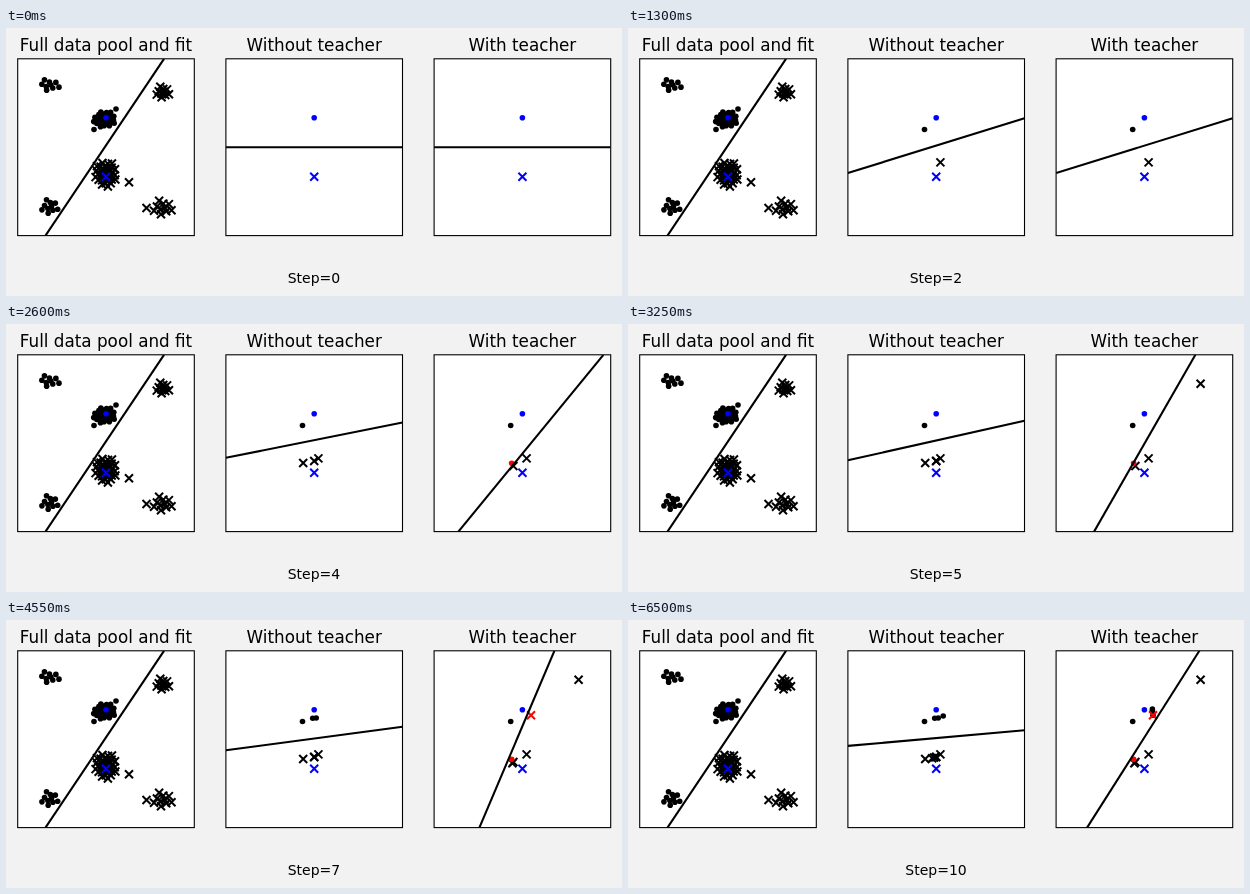
Write an HTML page that moves like this. It is 616 by 268 pixels and loops after 7.8 s.

```html
<!DOCTYPE html>
<html lang="en">
<head>
<meta charset="utf-8">
<title>Learning with and without a teacher</title>
<style>
html, body { margin: 0; width: 100%; height: 100%; overflow: hidden; background: #f2f2f2; }
svg { display: block; width: 616px; height: 268px; }
text { font-family: "DejaVu Sans", sans-serif; text-anchor: middle; fill: #000; }
.title { font-size: 16.8px; }
.step { font-size: 14px; }
.cross { fill: none; stroke-width: 2; }
.fit { stroke: #000; stroke-width: 2.1; }
.frame { fill: none; stroke: #000; stroke-width: 1.1; }
</style>
</head>
<body>
<svg id="stage" viewBox="0 0 616 268">
  <defs><clipPath id="box"><rect x="11.7" y="30.8" width="176.6" height="176.8"/></clipPath></defs>
</svg>
<script>
const STEP_MS = 650, LOOP_MS = 7800, LAST = 10;
const LEFT = 11.7, TOP = 30.8, WIDTH = 176.6, HEIGHT = 176.8;
const RIGHT = LEFT + WIDTH, BOTTOM = TOP + HEIGHT;
const PITCH = 208.2, GOLDEN = Math.PI * (3 - Math.sqrt(5));
const RED = '#f00', BLUE = '#00f';
const stage = document.getElementById('stage');

function set(el, attrs) {
  for (const k in attrs) el.setAttribute(k, attrs[k]);
  return el;
}

function add(parent, tag, attrs, text) {
  const el = set(document.createElementNS('http://www.w3.org/2000/svg', tag), attrs);
  if (text) el.textContent = text;
  return parent.appendChild(el);
}

function dot(parent, x, y, color = '#000') {
  return add(parent, 'circle', { cx: x, cy: y, r: 2.8, fill: color });
}

function cross(parent, x, y, color = '#000') {
  return add(parent, 'path', {
    class: 'cross', stroke: color,
    d: `M${x - 4} ${y - 4}l8 8m0 -8l-8 8`
  });
}

// Panels share one coordinate system and differ only by offset.
function panel(column, title) {
  const g = add(stage, 'g', { transform: `translate(${column * PITCH})` });
  const area = { x: LEFT, y: TOP, width: WIDTH, height: HEIGHT };
  add(g, 'rect', { ...area, fill: '#fff' });
  const black = add(g, 'g', {}), red = add(g, 'g', {});
  dot(g, 100, 89.8, BLUE);
  cross(g, 100, 148.8, BLUE);
  const fit = add(add(g, 'g', { 'clip-path': 'url(#box)' }), 'line', { class: 'fit' });
  add(g, 'rect', { ...area, class: 'frame' });
  add(g, 'text', { class: 'title', x: 100, y: 22.8 }, title);
  return { black, red, fit };
}

const across = (el, y1, y2) => set(el, { x1: LEFT, y1, x2: RIGHT, y2 });
const upward = (el, x1, x2) => set(el, { x1, y1: BOTTOM, x2, y2: TOP });

// Spiral scatter, denser toward the middle.
function cluster(mark, n, cx, cy, rx, ry) {
  for (let i = 0; i < n; i++) {
    const r = ((i + 0.5) / n) ** 0.6, a = i * GOLDEN;
    mark(pool.black, cx + rx * r * Math.cos(a), cy + ry * r * Math.sin(a));
  }
}

const pool = panel(0, 'Full data pool and fit');
cluster(dot, 9, 43, 57, 11, 6.5);
cluster(dot, 10, 44, 178.5, 9, 9);
cluster(dot, 32, 98.5, 91.5, 11.5, 8.5);
cluster(cross, 10, 157, 64, 7, 7);
cluster(cross, 10, 157, 179.5, 10, 9);
cluster(cross, 34, 100, 146, 11.5, 13);
dot(pool.black, 110, 81);
dot(pool.black, 88, 101.5);
cross(pool.black, 123, 154.3);
cross(pool.black, 140.5, 180);
upward(pool.fit, 39.5, 158);

// One point arrives with each step.
const alone = panel(1, 'Without teacher');
const taught = panel(2, 'With teacher');
const first = [[cross, 104.2, 134.4], [dot, 88.3, 101.5]];
const place = ({ black, red }, points) => points.map(([mark, x, y, color]) =>
  mark(color ? red : black, x, y, color));

const aloneMarks = place(alone, [
  ...first, [cross, 89, 139], [cross, 100, 137], [cross, 100, 137], [dot, 98.5, 98.2],
  [dot, 102, 98], [cross, 96, 138.3], [cross, 98, 137.5], [dot, 107, 96]
]);
const taughtMarks = place(taught, [
  ...first, [dot, 89.3, 139.2, RED], [cross, 91, 142], [cross, 156.2, 59.8], [cross, 90, 143.3],
  [cross, 108.6, 95.2, RED], [dot, 108, 89], [dot, 108.6, 95.2], [dot, 108, 91]
]);

// Key fits [step, left height, right height], linear in between.
const keys = [
  [0, 119.3, 119.3], [1, 118, 104], [2, 145, 90.3], [3, 131.3, 100.3],
  [5, 136.3, 96.8], [7, 130.3, 106.8], [9, 128.6, 106.8], [10, 125.9, 110.3]
];
function aloneFit(step) {
  const i = Math.max(1, keys.findIndex(k => k[0] >= step));
  const [s, l, r] = keys[i - 1], [s2, l2, r2] = keys[i];
  const p = (step - s) / (s2 - s);
  return [l + (l2 - l) * p, r + (r2 - r) * p];
}

// Bottom and top positions once the teacher steers, from step 3 on.
const steered = [
  [54.3, 156], [36, 181], [49.7, 151], [48, 155], [57, 132], [44, 157], [45, 151], [42.7, 155]
];

const label = add(stage, 'text', { class: 'step', x: 308, y: 255.2 });

function draw(step) {
  label.textContent = 'Step=' + step;
  for (const marks of [aloneMarks, taughtMarks])
    marks.forEach((m, i) => set(m, { visibility: i < step ? 'visible' : 'hidden' }));
  const edges = aloneFit(step);
  across(alone.fit, ...edges);
  if (step < 3) across(taught.fit, ...edges);
  else upward(taught.fit, ...steered[step - 3]);
}

const start = performance.now();
function tick() {
  const t = (performance.now() - start) % LOOP_MS;
  draw(Math.min(LAST, Math.floor(t / STEP_MS)));
  requestAnimationFrame(tick);
}
tick();
</script>
</body>
</html>
```
